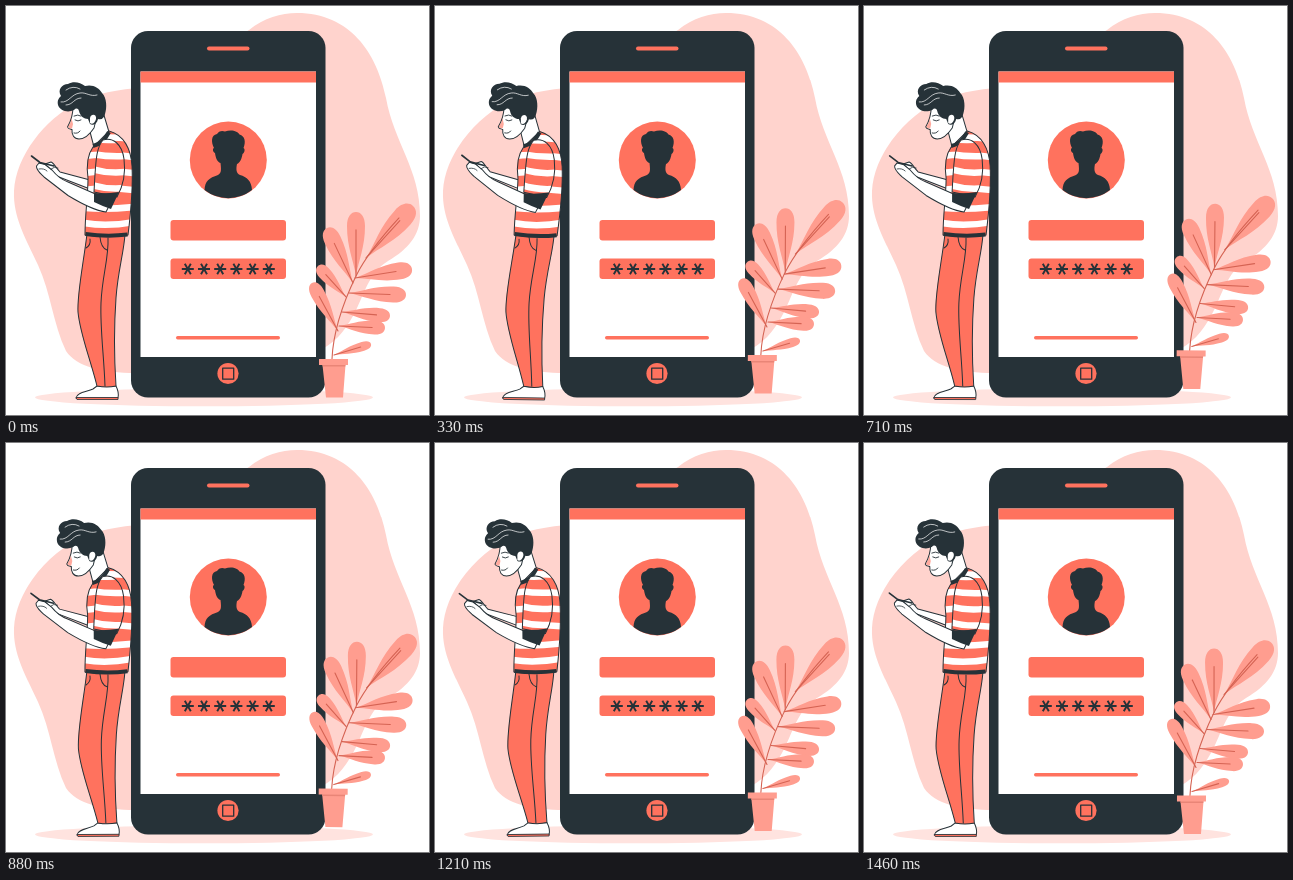
Animation of 423 by 409 pixels, one loop 1500 ms. Source, as an HTML page:

```html
<!DOCTYPE html>
<html lang="en">
<head>
<meta charset="utf-8">
<title>Login</title>
<style>
  html, body { margin: 0; width: 100%; height: 100%; overflow: hidden; background: #fff; }
  svg { display: block; width: 100vw; height: 100vh; }
  .accent { fill: #ff725e; }
  .dark { fill: #263238; }
  .pale { fill: #ffd3cd; }
  .shadow { fill: #ffe3df; }
  .leaf { fill: #ff9d8f; }
  .line { fill: none; stroke: #263238; stroke-width: 1; stroke-linecap: round; stroke-linejoin: round; }
  .skin { fill: #fff; stroke: #263238; stroke-width: 1; stroke-linejoin: round; }
  .cloth { fill: #ff725e; stroke: #263238; stroke-width: 1; stroke-linejoin: round; }
  .stripe { fill: none; stroke: #fff; stroke-width: 6.5; }
  .vein { fill: none; stroke: #d56353; stroke-width: 1.1; stroke-linecap: round; }
</style>
</head>
<body>
<svg viewBox="0 0 423 409">
  <defs>
    <clipPath id="torsoClip"><path id="torso" d="M87 141C82 148 80 158 82 172C82 190 79 208 79 229Q101 232 122 229C125 205 127 180 126 160C125 143 118 129 103 125Z"/></clipPath>
    <clipPath id="sleeveClip"><path id="sleeve" d="M97 134C90 142 90 157 89 168L88 186Q98 188 111 191C116 182 120 168 118 153C116 138 107 131 97 134Z"/></clipPath>
  </defs>

  <path class="pale" d="M8 185C10 150 38 114 72 96C91 87 110 84 140 81C190 78 208 43 243 24C258 12 275 7 291 7C344 7 371 47 380 92C388 137 414 163 414 210C414 228 403 243 382 255C362 267 358 290 347 310C338 326 328 338 312 345C270 365 190 367 130 367C96 367 71 361 60 345C47 318 45 287 32 259C19 231 7 211 8 185Z"/>
  <ellipse class="shadow" cx="198" cy="391.5" rx="169" ry="8.8"/>

  <g id="phone">
    <rect class="dark" x="125" y="25" width="194.5" height="366.5" rx="17"/>
    <rect x="134.5" y="65.5" width="175.5" height="285.5" fill="#fff"/>
    <rect class="accent" x="134.5" y="65.5" width="175.5" height="11"/>
    <rect class="accent" x="201" y="40.5" width="42.5" height="4" rx="2"/>
    <circle class="accent" cx="222" cy="367.5" r="10.6"/>
    <rect class="line" x="216.7" y="362.2" width="11" height="11" style="stroke-width:1.3"/>
    <circle class="accent" cx="222.3" cy="154" r="38.5"/>
    <path class="dark" d="M198.5 184C199 175 203 172 212 169C216 167 215 162 214.5 157C211 156 209.5 151 209 147C206.5 146 206.5 142 208 142C205 136 205 129 211 128C214 124 217 125 219 125.500C225 123 232 125 233.500 128.500C239 130 240 136 237.500 142C239.500 143 238.500 147 236.500 148C236 152 234 157 231 158C230 163 230 167 234 169C241 171 245.500 175 246 184A38.500 38.500 0 0 1 198.500 184Z"/>
    <rect class="accent" x="164.5" y="214" width="115.5" height="20.5" rx="3"/>
    <rect class="accent" x="164.5" y="252.5" width="115.5" height="20.5" rx="3"/>
    <path id="stars" class="line" style="stroke-width:1.9;stroke-linecap:butt"/>
    <rect class="accent" x="170" y="330" width="104" height="3.5" rx="1.7"/>
  </g>

  <g id="person">
    <!-- legs and shoes -->
    <path class="skin" d="M91 380L87 383C81 386 71 386 70 392H112C113 388 112 384 110 380Z"/>
    <path class="cloth" d="M70 391.5H112V393.5H71Z" style="stroke-width:.8"/>
    <path class="cloth" d="M81 228C77 260 71 288 72 306C74 328 84 352 91 380Q101 382 110 380C108 350 108 320 110 292C112 264 118 246 119 228Z"/>
    <path class="line" d="M102 232C103 252 96 270 95 297C94 323 98 350 99 380M94 231Q95 242 101 244M84 233Q85 239 80 242"/>

    <!-- far arm -->
    <path class="skin" d="M84 174L54 166C50 162 48 157 45 156L39 158L43 162C44 168 48 170 53 171L84 183Z"/>

    <!-- neck and face -->
    <path class="skin" d="M83 122L88 141Q97 138 103 126L97 106Z"/>
    <path class="skin" d="M67 100C67 109 65 115 61.500 121C62 123 64 123 66 123.500C65.500 129 68 133 73 133C79 133 84 128 88 122L92 106L78 97Z"/>
    <path class="accent" d="M65.500 112C65.500 116 63 119 62 121Q64 123 66 122.500L67 118Z" opacity=".6"/>
    <path class="line" d="M69 114Q72 116 75 114M68 110Q72 108 75 110M68 127Q72 128 74 125" style="stroke-width:.9"/>

    <!-- hair -->
    <path class="dark" d="M68 104C62 107 54 105 52 99C51 94 53 92 55 90C51 84 56 78 62 78C67 75 74 76 79 80C87 78 93 82 96 87C101 92 101 102 99 108C98 112 96 114 92 113C91 118 87 120 84 118L82 113C78 113 74 110 73 105C72 102 70 102 68 104Z"/>
    <path d="M84 112C85 107 91 108 90 113C89 117 86 119 84 117Z" fill="#fff"/>
    <path class="line" d="M55 96C63 97 65 88 74 87C80 86 84 91 91 89M60 99C67 99 68 92 75 92M60 84Q67 79 74 83" style="stroke:#fff;stroke-width:.7"/>

    <!-- shirt -->
    <use href="#torso" class="accent"/>
    <g clip-path="url(#torsoClip)">
      <path class="stripe" d="M78 133Q100 130 128 133M78 150Q100 147 128 151M78 167Q100 164 128 167M78 184Q100 181 128 184M78 202Q100 204 128 201M78 217Q101 221 128 216"/>
    </g>
    <use href="#torso" class="line"/>
    <path class="line" d="M87 140Q97 138 103 126" style="stroke-width:4;stroke-linecap:butt"/>
    <path class="line" d="M79.500 228Q101 231 121.500 228.500" style="stroke-width:4;stroke-linecap:butt"/>

    <!-- near arm -->
    <path class="skin" d="M94 190L62 176C54 173 50 169 46 164L39 158.500L33 157L30.500 160C30 164 34 167 38 171L62 189.500C76 198 88 204.500 100 206L106 194Z"/>
    <path class="line" d="M33 163Q38 162 41 165M45 163Q48 160 52 162" style="stroke-width:.8"/>
    <use href="#sleeve" class="accent"/>
    <g clip-path="url(#sleeveClip)">
      <path class="stripe" d="M86 133Q102 135 120 133M86 148Q102 151 120 150M86 163Q102 168 120 166M86 179Q102 184 120 182"/>
    </g>
    <use href="#sleeve" class="line"/>
    <path class="dark" d="M88 187Q100 188 113 186L105 203Q96 200 88 196Z"/>
    <path class="line" d="M25.500 150L34 156.500L48 160" style="stroke-width:1.6"/>
  </g>

  <g id="plant">
    <g id="leaves">
      <path class="vein" d="M326 353C327 330 334 303 350 270C358 254 371 236 393 212"/>
    </g>
    <path class="leaf" d="M313 353H342V359H339.500L337 391.500H320L316.500 359H313Z"/>
    <path d="M316.500 359H339.500L339.300 360.500H316.700Z" fill="#e98577"/>
  </g>
</svg>
<script>
const LOOP = 1500;
const $ = id => document.getElementById(id);

// Base x, y, tip x, y and width of each leaf.
const leaves = [
  [360, 252, 407, 200, 21], [350, 270, 350, 206, 18],
  [347, 277, 321, 222, 17], [340, 291, 312, 260, 13],
  [332, 325, 306, 277, 14], [349, 272, 406, 263, 17],
  [343, 287, 400, 289, 16], [336, 306, 384, 310, 14],
  [333, 320, 379, 322, 14], [328, 349, 365, 338, 9]
];

function addLeaf([x, y, tipX, tipY, width]) {
  const len = Math.hypot(tipX - x, tipY - y);
  const turn = Math.atan2(tipY - y, tipX - x) * 180 / Math.PI;
  const h = width / 2;
  const side = s => `M0 0C${len * .25} ${s * h * .3} ${len * .45} ${s * h} ${len * .78} ${s * h}` +
    `C${len * .93} ${s * h} ${len} ${s * h * .55} ${len} 0Z`;
  $('leaves').insertAdjacentHTML('beforeend',
    `<g transform="translate(${x} ${y}) rotate(${turn})">
      <path class="leaf" d="${side(-1)}${side(1)}"/><path class="vein" d="M0 0H${len * .72}"/></g>`);
}

leaves.forEach(addLeaf);
$('leaves').append($('leaves').firstElementChild);

let stars = '';
for (let i = 0; i < 6; i++) {
  const x = 181.8 + i * 16.2;
  stars += `M${x - 6} 263h12M${x - 3} 257.8l6 10.4M${x + 3} 257.8l-6 10.4`;
}
$('stars').setAttribute('d', stars);

// Linear sway 0, 1, -1, 0 at quarter, three quarters and end of the loop.
const sway = p => p < .25 ? p * 4 : p < .75 ? 2 - p * 4 : p * 4 - 4;
const lift = p => 1 - Math.abs(1 - 2 * p);

function draw() {
  const p = performance.now() % LOOP / LOOP;
  $('person').setAttribute('transform', `rotate(${sway(p)} 75 236)`);
  $('plant').setAttribute('transform', `translate(0 ${-9 * lift(p)}) rotate(${.6 * lift(p)} 328 320)`);
  requestAnimationFrame(draw);
}
draw();
</script>
</body>
</html>
```
